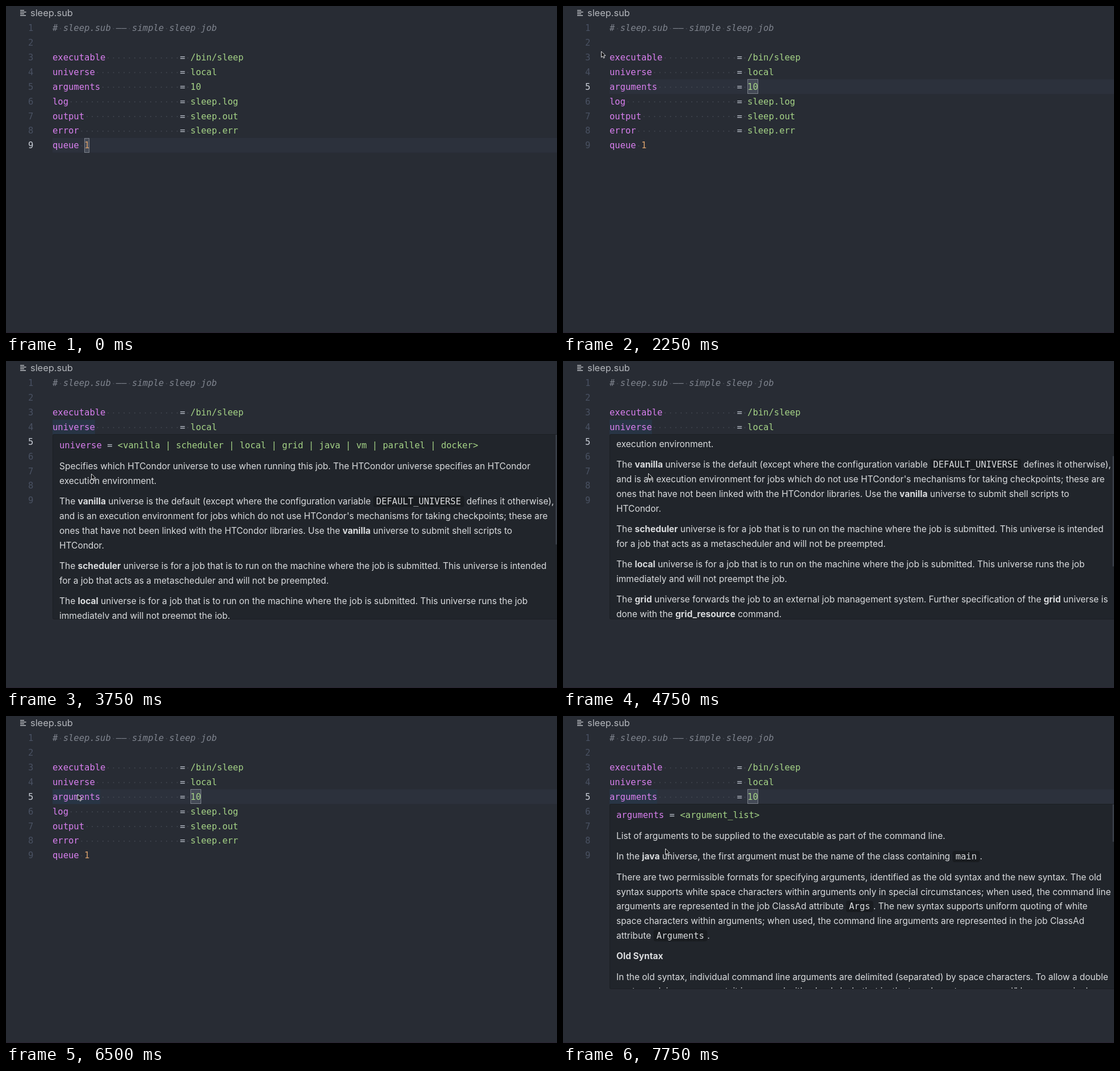
An HTML page with a canvas for the animation above (8000 ms loop, 971 px wide and 577 px high).

```html
<!DOCTYPE html>
<html lang="en">
<head>
<meta charset="utf-8">
<title>sleep.sub</title>
<style>
html, body { margin: 0; width: 100%; height: 100%; overflow: hidden; background: #282c34; }
canvas { display: block; width: 971px; height: 577px; }
</style>
</head>
<body>
<canvas id="stage"></canvas>
<script>
const W = 971, H = 577, LOOP = 8000, TICK = 250;
const COL = 9.35, ROW = 25.85, LEFT = 82, TOP = 26;
const MONO = '15.53px "DejaVu Sans Mono", "Liberation Mono", monospace';
const SANS = '15.5px Inter, "Liberation Sans", sans-serif';
const C = {
  bg: '#282c34', band: '#2c313c', dot: '#464b55', num: '#495162', numOn: '#c8cdd6',
  key: '#d87fee', val: '#a5d386', op: '#bcc2cc', int: '#d8a06c', note: '#7f848e',
  pop: '#21252b', edge: '#1c1f24', text: '#dadcde', chip: '#191c20', hover: '#283545'
};

const fields = [
  ['executable', '/bin/sleep'], ['universe', 'local'], ['arguments', '10'],
  ['log', 'sleep.log'], ['output', 'sleep.out'], ['error', 'sleep.err']
];

// Each paragraph is a list of wrapped lines; ** marks bold, ` marks code.
const docs = {
  universe: {
    row: 4, height: 546,
    usage: '<vanilla | scheduler | local | grid | java | vm | parallel | docker>',
    body: [
      ['Specifies which HTCondor universe to use when running this job. The HTCondor universe specifies an HTCondor',
        'execution environment.'],
      ['The **vanilla** universe is the default (except where the configuration variable `DEFAULT_UNIVERSE` defines it otherwise),',
        "and is an execution environment for jobs which do not use HTCondor's mechanisms for taking checkpoints; these are",
        'ones that have not been linked with the HTCondor libraries. Use the **vanilla** universe to submit shell scripts to',
        'HTCondor.'],
      ['The **scheduler** universe is for a job that is to run on the machine where the job is submitted. This universe is intended',
        'for a job that acts as a metascheduler and will not be preempted.'],
      ['The **local** universe is for a job that is to run on the machine where the job is submitted. This universe runs the job',
        'immediately and will not preempt the job.'],
      ['The **grid** universe forwards the job to an external job management system. Further specification of the **grid** universe is',
        'done with the **grid_resource** command.'],
      ['The **java** universe is for programs written to the Java Virtual Machine.'],
      ['The **vm** universe facilitates the execution of a virtual machine.'],
      ['The **parallel** universe is for parallel jobs (e.g. MPI) that require multiple machines in order to run.'],
      ['The **docker** universe runs a docker container as an HTCondor job.']
    ]
  },
  arguments: {
    row: 5, height: 1590,
    usage: '<argument_list>',
    body: [
      ['List of arguments to be supplied to the executable as part of the command line.'],
      ['In the **java** universe, the first argument must be the name of the class containing `main`.'],
      ['There are two permissible formats for specifying arguments, identified as the old syntax and the new syntax. The old',
        'syntax supports white space characters within arguments only in special circumstances; when used, the command line',
        'arguments are represented in the job ClassAd attribute `Args`. The new syntax supports uniform quoting of white',
        'space characters within arguments; when used, the command line arguments are represented in the job ClassAd',
        'attribute `Arguments`.'],
      ['**Old Syntax**'],
      ['In the old syntax, individual command line arguments are delimited (separated) by space characters. To allow a double',
        'quote mark in an argument, it is escaped with a backslash; that is, the two character sequence \\" becomes a single']
    ]
  }
};

// [time, x, y] of the pointer, which is hidden before the first entry
const path = [
  [750, 472, 138], [1000, 440, 138], [1250, 330, 116], [1500, 190, 93], [1750, 137, 91],
  [2000, 96, 88], [2250, 67, 80], [2500, 67, 80], [2750, 69, 91], [3000, 98, 104],
  [3250, 142, 112], [3500, 146, 118], [3750, 150, 199], [5500, 150, 198], [5750, 118, 186],
  [6000, 77, 162], [6250, 96, 146], [6500, 126, 138], [6750, 126, 138], [7750, 180, 234]
];
const scroll = [[4250, 0], [4500, 14], [4750, 65], [5000, 155], [5250, 220]];

const canvas = document.getElementById('stage');
const ctx = canvas.getContext('2d');
const ratio = window.devicePixelRatio || 1;
canvas.width = W * ratio;
canvas.height = H * ratio;
ctx.scale(ratio, ratio);

// Linear interpolation of [time, ...values] keys, held at both ends.
function at(keys, t) {
  const i = keys.findIndex(k => k[0] > t);
  if (i < 0) return keys[keys.length - 1].slice(1);
  if (i === 0) return keys[0].slice(1);
  const a = keys[i - 1], b = keys[i], u = (t - a[0]) / (b[0] - a[0]);
  return a.slice(1).map((v, n) => v + (b[n + 1] - v) * u);
}

const mid = row => TOP + (row - 0.5) * ROW;
const edge = row => TOP + (row - 1) * ROW;

function rect(x, y, w, h, color) {
  ctx.fillStyle = color;
  ctx.fillRect(x, y, w, h);
}

function text(str, x, y, color, font = MONO) {
  ctx.font = font;
  ctx.fillStyle = color;
  ctx.fillText(str, x, y + 5.5);
  return ctx.measureText(str).width;
}

function rounded(x, y, w, h, r, color) {
  ctx.fillStyle = color;
  ctx.beginPath();
  ctx.roundRect(x, y, w, h, r);
  ctx.fill();
}

// Code with its spaces shown as faint dots
function code(str, col, row, color, font) {
  [...str].forEach((ch, i) => {
    if (ch === ' ') rect(LEFT + (col + i + 0.5) * COL - 0.8, mid(row) + 0.2, 1.6, 1.6, C.dot);
  });
  text(str, LEFT + col * COL, mid(row), color, font);
}

function mark(col, row, len) {
  const x = Math.round(LEFT + col * COL) + 0.5, y = Math.round(edge(row)) + 0.5;
  const w = Math.round(len * COL) - 1;
  rect(x, y, w, 25, '#444a56');
  ctx.strokeStyle = '#7d828c';
  ctx.lineWidth = 1;
  ctx.strokeRect(x, y, w, 25);
}

function header() {
  [[7, 7], [10, 10.5], [13, 7], [16, 10]].forEach(([y, w]) => rect(25, y, w, 1.4, '#c3c6ca'));
  text('sleep.sub', 43, 12, '#b3b6bb', '16.4px Inter, "Liberation Sans", sans-serif');
}

function editor(active, word) {
  rect(LEFT, edge(active), W - LEFT, ROW, C.band);
  if (word) rect(LEFT, edge(docs[word].row), word.length * COL, ROW, C.hover);
  if (active === 9) mark(6, 9, 1);
  else mark(26, 5, 2);
  for (let n = 1; n <= 9; n++) text(n, 39, mid(n), n === active ? C.numOn : C.num);
  // The editor joins the two hyphens into one long stroke.
  code('# sleep.sub –– simple sleep job', 0, 1, C.note, 'italic ' + MONO);
  fields.forEach(([key, val], i) => {
    code(key.padEnd(24), 0, i + 3, C.key);
    code('= ', 24, i + 3, C.op);
    code(val, 26, i + 3, C.val);
  });
  code('queue ', 0, 9, C.key);
  code('1', 6, 9, C.int);
}

function rich(line, x, y) {
  for (const part of line.split(/(\*\*.+?\*\*|`.+?`)/)) {
    if (part[0] === '`') {
      const str = part.slice(1, -1), w = str.length * COL;
      rounded(x, y - 10, w + 10.5, 20, 4, C.chip);
      text(str, x + 5.2, y, C.text);
      x += w + 10.5;
    } else if (part.startsWith('**')) {
      x += text(part.slice(2, -2), x, y, C.text, 'bold ' + SANS);
    } else {
      x += text(part, x, y, C.text, SANS);
    }
  }
}

function popup(name, shift) {
  const { row, height, usage, body } = docs[name];
  const top = Math.floor(edge(row + 1)), view = 326;
  rounded(LEFT, top, W, view + 1, 3, C.edge);
  ctx.save();
  ctx.beginPath();
  ctx.roundRect(LEFT + 1, top + 1, W, view - 1, 2);
  ctx.clip();
  rect(LEFT, top, W, view, C.pop);
  let y = top + 19 - shift;
  const x = 94;
  text(name, x, y, C.key);
  text('=', x + (name.length + 1) * COL, y, C.op);
  text(usage, x + (name.length + 3) * COL, y, C.val);
  y += 37.7;
  for (const para of body) {
    for (const line of para) {
      rich(line, x, y);
      y += ROW;
    }
    y += 10.4;
  }
  rect(968.5, top + shift * view / height, 3, view * view / height, '#3a4049');
  ctx.restore();
}

function pointer(x, y) {
  ctx.save();
  ctx.translate(x + 0.5, y);
  ctx.beginPath();
  [[0, 0], [0, 10.6], [2.4, 8.4], [4, 12], [5.8, 11.2], [4.3, 7.8], [7.5, 7.6]]
    .forEach(p => ctx.lineTo(...p));
  ctx.closePath();
  ctx.fillStyle = '#0b0c0e';
  ctx.fill();
  ctx.strokeStyle = '#e4e5e7';
  ctx.lineWidth = 1;
  ctx.stroke();
  ctx.restore();
}

function draw(t) {
  const within = (a, b) => t >= a && t < b;
  rect(0, 0, W, H, C.bg);
  rect(0, H - 1, W, 1, '#2b2333');
  const word = within(3250, 6000) ? 'universe' : t >= 6500 ? 'arguments' : '';
  header();
  editor(t < 1000 ? 9 : 5, word);
  if (within(3500, 6000)) popup('universe', at(scroll, t)[0]);
  if (t >= 6750) popup('arguments', 0);
  if (t >= path[0][0]) pointer(...at(path, t));
}

function loop(now) {
  const t = now % LOOP;
  draw(t - t % TICK);
  requestAnimationFrame(loop);
}
requestAnimationFrame(loop);
</script>
</body>
</html>
```
